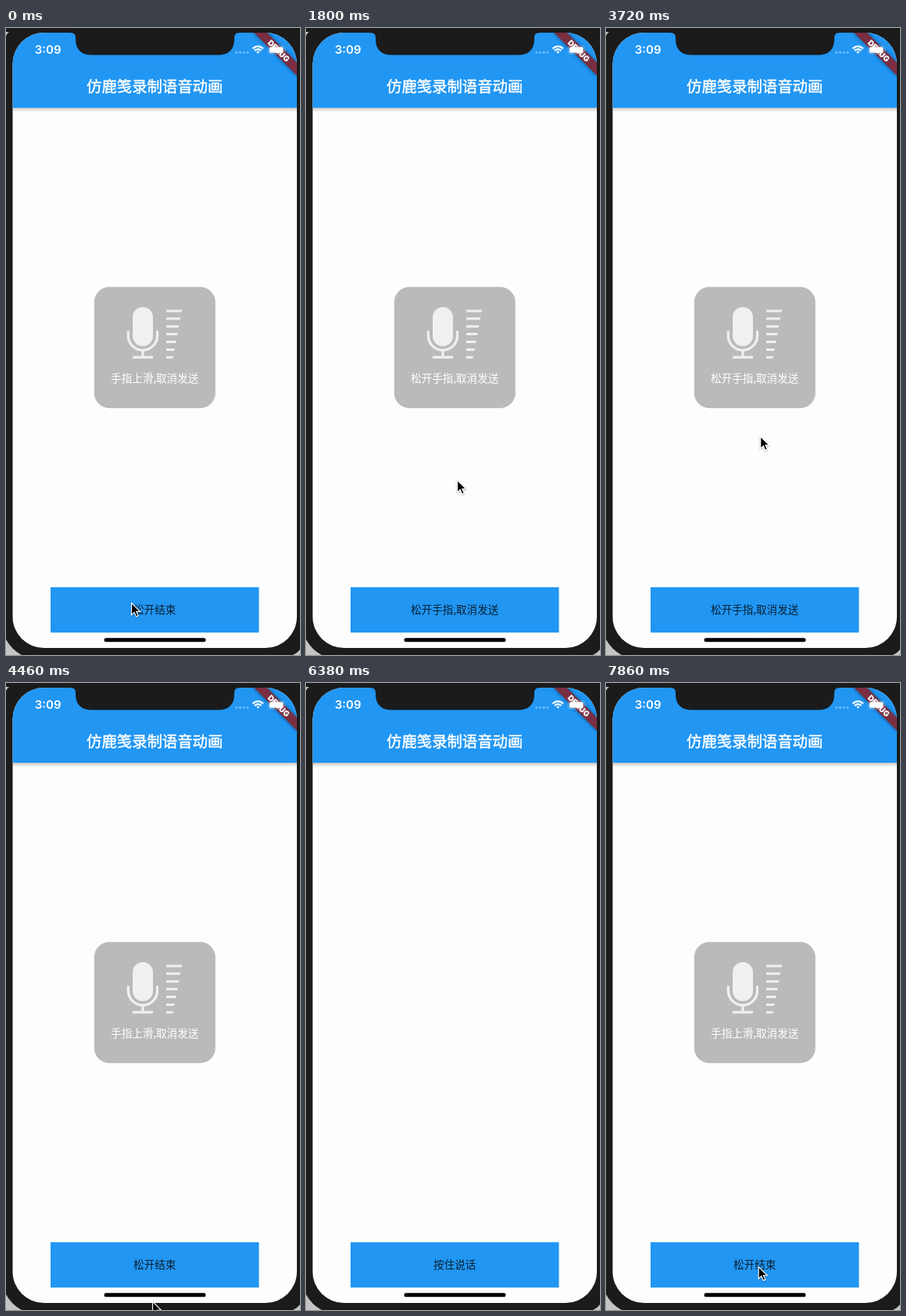
An HTML page that plays this animation: 376 px wide and 802 px high, repeating every 8000 ms.

```html
<!DOCTYPE html>
<html lang="zh-CN">
<head>
<meta charset="utf-8">
<title>录制语音动画</title>
<style>
  html, body { margin: 0; width: 100%; height: 100%; overflow: hidden; background: #1b1b1b; }
  svg { display: block; width: 376px; height: 802px; }
  text { font-family: "Noto Sans CJK SC", "Noto Sans CJK", sans-serif; text-anchor: middle; }
  .body { font-size: 13.55px; }
  .title { font-size: 19.36px; fill: #fff; stroke: #fff; stroke-width: .45px; }
  .latin { font-family: Inter, Roboto, sans-serif; fill: #fff; }
</style>
</head>
<body>
<svg viewBox="0 0 376 802">
  <defs>
    <clipPath id="screen"><rect x="8.5" y="6" width="363.5" height="787" rx="40"/></clipPath>
    <linearGradient id="shade" x2="0" y2="1">
      <stop offset="0" stop-opacity=".22"/>
      <stop offset="1" stop-opacity="0"/>
    </linearGradient>
    <filter id="blur" x="-20%" y="-100%" width="140%" height="300%"><feGaussianBlur stdDeviation="2.5"/></filter>
    <filter id="drop" x="-50%" y="-50%" width="200%" height="200%">
      <feDropShadow dx="0" dy="1" stdDeviation=".8" flood-opacity=".35"/>
    </filter>
  </defs>

  <!-- phone body -->
  <rect width="376" height="802" fill="#1b1b1b"/>
  <path d="M0 5H4Q1 7 0 10ZM0 782Q7 795 20 802H0ZM376 795Q373 799 367 802H376Z" fill="#c4c4c4"/>

  <g clip-path="url(#screen)">
    <rect width="376" height="802" fill="#fdfdfd"/>
    <rect y="102" width="376" height="5.5" fill="url(#shade)"/>
    <rect width="376" height="102" fill="#2196f3"/>
    <text class="title" x="190.2" y="82.3">仿鹿笺录制语音动画</text>

    <rect x="57" y="715.3" width="266.5" height="58" fill="#2196f3"/>
    <text class="body" id="label" x="190.2" y="749.2" fill-opacity=".8"></text>

    <g transform="translate(372 6)rotate(45)">
      <rect x="-39" y="27.1" width="78" height="11.6" opacity=".5" filter="url(#blur)"/>
      <rect x="-39" y="27.1" width="78" height="11.6" fill="#7a2e41"/>
      <text class="latin" y="36.5" font-size="10" font-weight="900">DEBUG</text>
    </g>
  </g>

  <!-- notch and status bar -->
  <path d="M82 5V6Q89 6 89 12V14Q89 34.5 110 34.5H271Q292 34.5 292 14V12Q292 6 299 6V5Z" fill="#1b1b1b"/>
  <text class="latin" x="53.7" y="33.2" font-size="15" font-weight="600">3:09</text>
  <path d="M294.8 31.3H310" stroke="#fff" stroke-opacity=".35" stroke-width="3.2" stroke-linecap="round" stroke-dasharray="0 4.7"/>
  <path d="M315.4 26.4Q322.2 20.2 329 26.4M317.9 29Q322.2 25.2 326.5 29" fill="none" stroke="#fff" stroke-width="2.2"/>
  <path d="M320.2 30.6Q322.2 29 324.2 30.6L322.2 32.8Z" fill="#fff"/>
  <rect x="335.2" y="22.8" width="21" height="10.4" rx="3" fill="none" stroke="#fff" stroke-opacity=".35"/>
  <rect x="336.8" y="24.3" width="17.8" height="7.4" rx="1.8" fill="#fff"/>
  <path d="M357.3 26.4Q358.8 28 357.3 29.7Z" fill="#fff" fill-opacity=".4"/>

  <rect x="125.5" y="780.3" width="130" height="5" rx="2.5"/>

  <g id="panel">
    <rect x="112.8" y="331.3" width="155" height="155" rx="19.4" fill="#b9bbba"/>
    <rect x="162" y="357" width="26" height="50" rx="13" fill="#f0f0f0"/>
    <path d="M156.3 388.5V393.5A18.6 18.6 0 0 0 193.5 393.5V388.5M175 412V421M163.3 421.2H186.8"
      fill="none" stroke="#f0f0f0" stroke-width="3.2" stroke-linecap="round"/>
    <path id="bars" fill="#f0f0f0"/>
    <text class="body" id="hint" x="190.2" y="452.8" fill="#fff"></text>
  </g>

  <g id="cursor">
    <path d="M.5.5V15.7L4.1 12.4L6.5 17.9L9.1 16.8L6.7 11.4H11.5Z" stroke="#fff" stroke-width="1.1" filter="url(#drop)"/>
  </g>
</svg>
<script>
  const LOOP = 8, STEP = LOOP / 54;
  const RELEASE = 4.55, PRESS = 7.65;
  const CANCEL_Y = 640;                  // sliding above this line cancels
  const el = id => document.getElementById(id);

  // turning points of the pointer: seconds, x, y
  const turns = [
    [0, 160, 735], [1.2, 194, 434], [1.28, 194, 434], [2.38, 192, 770],
    [2.8, 191, 768], [3.55, 198, 500], [4.46, 187, 791], [4.6, 186, 812],
    [4.9, 180, 812], [5.2, 180, 777], [5.5, 186, 768], [5.8, 136, 710],
    [6, 160, 674], [6.24, 220, 700], [6.9, 293, 771], [7.6, 196, 747], [LOOP, 194, 746]
  ];

  function pointer(t) {
    const i = turns.findIndex(p => p[0] > t);
    const [a, ax, ay] = turns[i - 1], [b, bx, by] = turns[i];
    const p = (t - a) / (b - a), f = p * p * (3 - 2 * p);
    return [ax + (bx - ax) * f, ay + (by - ay) * f];
  }

  function show(id, on) { el(id).style.display = on ? '' : 'none'; }

  function setText(id, text) {
    if (el(id).textContent !== text) el(id).textContent = text;
  }

  let bars = '';
  for (let i = 0; i < 7; i++) {
    const y = 360.4 + i * 9.9, end = 225.5 - i * 1.9;
    bars += `M205 ${y}H${end}l-1 3H205Z`;
  }
  el('bars').setAttribute('d', bars);

  function draw(seconds) {
    const t = Math.floor((seconds % LOOP + .01) / STEP) % 54 * STEP;
    const [x, y] = pointer(t);
    const pressed = t < RELEASE || t > PRESS;
    const cancel = pressed && y < CANCEL_Y && '松开手指,取消发送';
    el('cursor').setAttribute('transform', `translate(${x} ${y})`);
    show('cursor', t < 6.3 || t > 6.9);
    show('panel', pressed);
    setText('hint', cancel || '手指上滑,取消发送');
    setText('label', cancel || (pressed ? '松开结束' : '按住说话'));
  }

  const start = performance.now();
  function loop() {
    draw((performance.now() - start) / 1000);
    requestAnimationFrame(loop);
  }
  loop();
</script>
</body>
</html>
```
